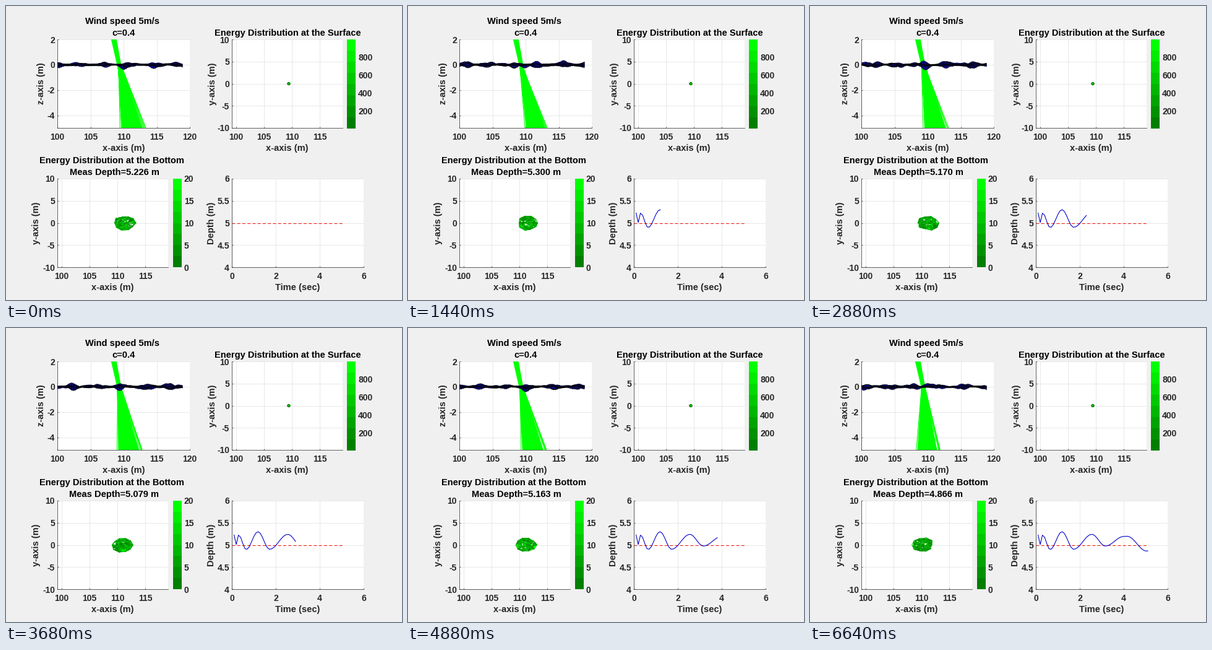
A matplotlib script that plays this animation: 640x475 px, repeating every 6720 ms.

```python
import numpy as np
import matplotlib.pyplot as plt
from matplotlib.animation import FuncAnimation
from matplotlib.collections import LineCollection, PolyCollection
from matplotlib.colors import LinearSegmentedColormap
from matplotlib.patches import Ellipse
from matplotlib.tri import Triangulation

W, H, DPI = 640, 475, 100
PT = 72 / DPI
INK, BEAM = "#262626", "#00ff00"
GREENS = LinearSegmentedColormap.from_list("greens", [(0, .5, 0), (0, 1, 0)], N=8)

# Turning points (time, depth) of the measured curve
TURNS = [(.1, 5.226), (.2, 5.01), (.31, 5.226), (.65, 4.895), (1.19, 5.3),
         (1.72, 4.902), (2.55, 5.24), (3.165, 4.975), (4.0, 5.192),
         (4.15, 5.197), (5.05, 4.86), (5.1, 4.866)]


def eased(t, points):
    """Join the points with half cosine waves."""
    px, py = np.transpose(points)
    i = np.clip(np.searchsorted(px, t, side="right") - 1, 0, len(px) - 2)
    f = np.clip((t - px[i]) / (px[i + 1] - px[i]), 0, 1)
    return py[i] + (py[i + 1] - py[i]) * (1 - np.cos(np.pi * f)) / 2


TIME = 0.1 * np.arange(1, 52)
DEPTH = eased(TIME, TURNS)

plt.rcParams.update({
    "font.family": "Liberation Sans", "font.weight": "bold", "font.size": 14 * PT,
    "text.color": "black", "axes.edgecolor": INK, "axes.linewidth": 0.7 * PT,
    "xtick.color": INK, "ytick.color": INK,
    "xtick.direction": "in", "ytick.direction": "in",
})
fig = plt.figure(figsize=(W / DPI, H / DPI), dpi=DPI, facecolor="#f0f0f0")


def put(x, y, s, **kw):
    return fig.text(x / W, 1 - y / H, s, fontsize=14.67 * PT, ha="center", **kw)


def box(x0, y0, x1, y1):
    return fig.add_axes([x0 / W, 1 - y1 / H, (x1 - x0) / W, (y1 - y0) / H])


def panel(rect, xlim, ylim, xticks, yticks, xlabel, ylabel, label_x):
    ax = box(*rect)
    ax.set(xlim=xlim, ylim=ylim, xticks=xticks, yticks=yticks)
    ax.set_xticklabels([f"{v:g}" for v in xticks])
    ax.set_yticklabels([f"{v:g}" for v in yticks])
    ax.spines[["top", "right"]].set_visible(False)
    ax.grid(color="#dfdfdf", lw=0.7 * PT)
    ax.set_axisbelow(True)
    ax.tick_params(length=2 * PT, width=0.7 * PT)
    ax.tick_params(axis="x", pad=8.2 * PT)
    ax.tick_params(axis="y", pad=4 * PT)
    x0, y0, x1, y1 = rect
    put((x0 + x1) / 2, y1 + 37, xlabel, va="baseline", color=INK)
    put(label_x, (y0 + y1) / 2, ylabel, va="center", rotation=90, color=INK)
    return ax


def colorbar(rect, top, ticks):
    ax = box(*rect)
    ax.imshow(np.arange(8)[:, None], cmap=GREENS, aspect="auto", origin="lower",
              extent=[0, 1, 0, top], interpolation="nearest")
    ax.set(xticks=[], yticks=ticks)
    ax.spines[:].set_visible(False)
    ax.yaxis.tick_right()
    ax.tick_params(length=0, pad=4 * PT)


map_x, map_y = (99.2, 119.1), (-10, 10)
map_ticks = [100, 105, 110, 115], [-10, -5, 0, 5, 10]
side = panel((83, 54, 297, 197), (100, 120), (-5, 2), [100, 105, 110, 115, 120],
             [-4, -2, 0, 2], "x-axis (m)", "z-axis (m)", 57)
top_map = panel((365, 54, 544, 197), map_x, map_y, *map_ticks,
                "x-axis (m)", "y-axis (m)", 334)
floor_map = panel((83, 279, 262, 422), map_x, map_y, *map_ticks,
                  "x-axis (m)", "y-axis (m)", 49)
chart = panel((365, 279, 578, 422), (0, 6), (4, 6), [0, 2, 4, 6],
              [4, 4.5, 5, 5.5, 6], "Time (sec)", "Depth (m)", 332)
colorbar((551, 54, 565, 198), 1000, [200, 400, 600, 800])
colorbar((270, 279, 284, 422), 20, [0, 5, 10, 15, 20])

put(188.5, 29.5, "Wind speed 5m/s")
put(190, 48.5, "c=0.4")
put(455, 48, "Energy Distribution at the Surface")
put(171, 254, "Energy Distribution at the Bottom")
depth_text = put(175, 273, "")

# Fixed parts
side.fill([108.12, 108.95, 109.65, 109], [2, 2, 0, 0], color=BEAM, lw=0, zorder=2)
top_map.add_patch(Ellipse((109.43, 0), 0.5, 0.6, fc="#00c000", ec="#005a00",
                          lw=0.9 * PT, zorder=3))
chart.plot([0, 5.1], [5, 5], color="#f02010", lw=1.1 * PT, dashes=(4.5, 3), zorder=2)

# Moving parts
rays = side.add_collection(LineCollection([], colors=BEAM, linewidths=1.1 * PT, zorder=2))
water, = side.fill([0, 1, 1], [0, 0, 1], color="#101090", lw=0, zorder=3)
mesh = side.add_collection(LineCollection([], colors="black", linewidths=0.55 * PT, zorder=4))
spot = floor_map.add_collection(PolyCollection([], linewidths=0.5 * PT, zorder=3))
track, = chart.plot([], [], color="#0000c8", lw=1.1 * PT, zorder=3)

rng = np.random.default_rng(5)
WAVE_K = rng.uniform(1.2, 3.5, 8)
WAVE_DIR = rng.uniform(-1, 1, 8)
WAVE_PHASE = rng.uniform(0, 2 * np.pi, 8)
SEA_X, SEA_Y = np.meshgrid(np.linspace(100, 118.9, 70), np.linspace(-9, 9, 11))


def surface(step):
    """Heights of the wavy sheet, one row per y slice."""
    t = 0.1 * step
    z = np.zeros_like(SEA_X)
    for k, d, p in zip(WAVE_K, WAVE_DIR, WAVE_PHASE):
        z += np.cos(k * (SEA_X * np.cos(d) + SEA_Y * np.sin(d)) - np.sqrt(9.8 * k) * t + p)
    z *= 0.042 * (1 + 0.45 * np.cos(1.7 * SEA_X - 1.5 * t))
    lift = np.clip((5.06 - DEPTH[step]) * 2, -0.22, 0.25)
    return z + lift * np.exp(-((SEA_X - 109.9) / 0.8) ** 2 - (SEA_Y / 2) ** 2)


def footprint(step, rnd):
    """Outline of the light on the bottom; it drifts with the measured depth."""
    cx = 110.35 + 3.1 * (DEPTH[step] - 4.9)
    angles = np.linspace(0, 2 * np.pi, 10, endpoint=False)
    r = rnd.uniform(0.88, 1.12, 10)
    return np.column_stack([cx + 1.85 * r * np.cos(angles), 1.6 * r * np.sin(angles)])


def draw_surface(step):
    z, xs = surface(step), SEA_X[0]
    low, high = z.min(0), z.max(0)
    water.set_xy(np.column_stack([np.r_[xs, xs[::-1]], np.r_[low, high[::-1]]]))
    rows = [np.column_stack([xs, row]) for row in z]
    cols = [[(x, a), (x, b)] for x, a, b in zip(xs, low, high)]
    mesh.set_segments(rows + cols)


def draw_rays(outline, rnd):
    """Dense bundle with a few strays; crossing rays give the narrow waist."""
    lo, hi = outline[:, 0].min(), outline[:, 0].max()
    u = np.r_[np.linspace(0.06, 0.86, 80), 0, 1, rnd.uniform(0.86, 1, 4)]
    start = 109 + 0.65 * (0.6 * u + 0.4 * rnd.random(len(u)))
    rays.set_segments([[(s, 0), (lo + (hi - lo) * v, -5)] for s, v in zip(start, u)])


def draw_spot(outline, rnd):
    centre, n = outline.mean(0), len(outline)
    i = rnd.integers(0, n, 75)
    a, s = rnd.random((75, 1)), np.sqrt(rnd.random((75, 1)))
    rim = outline[i] * (1 - a) + outline[(i + 1) % n] * a
    pts = np.vstack([outline, centre + s * (rim - centre)])
    tri = Triangulation(*pts.T).triangles
    faces = GREENS(rnd.random(len(tri)) ** 1.8)
    near = np.abs(pts[tri].mean(1)[:, 1]) < 0.9
    faces[near & (rnd.random(len(tri)) < 0.15)] = (0.85, 1, 0.85, 1)
    spot.set_verts(pts[tri])
    spot.set_facecolor(faces)
    spot.set_edgecolor(GREENS(rnd.random(len(tri)) * 0.6))


def step_at(tick):
    """Three steps are spread over five ticks, after a first single tick."""
    return int(np.ceil(0.6 * tick - 0.1)) if tick else 0


def update(tick):
    step = step_at(tick)
    rnd = np.random.default_rng(100 + step)
    outline = footprint(step, rnd)
    draw_surface(step)
    draw_rays(outline, rnd)
    draw_spot(outline, rnd)
    track.set_data(TIME[:step + 1], DEPTH[:step + 1])
    depth_text.set_text(f"Meas Depth={DEPTH[step]:.3f} m")
    return rays, water, mesh, spot, track, depth_text


anim = FuncAnimation(fig, update, frames=84, interval=80, init_func=lambda: update(0),
                     repeat=True, repeat_delay=0, blit=False)
plt.show()
```
